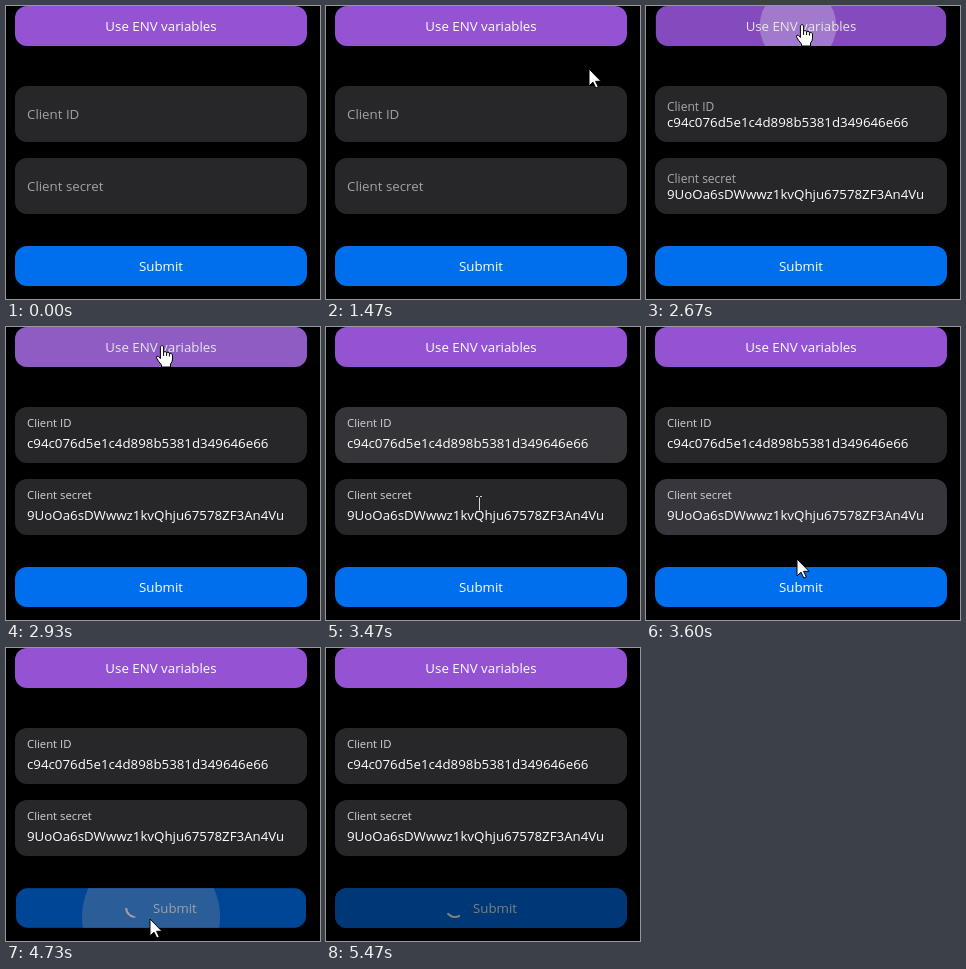
An HTML page with a canvas that plays this animation: 314x293 px, repeating every 5.54 s.

```html
<!DOCTYPE html>
<html lang="en">
<head>
<meta charset="utf-8">
<title>Credentials form</title>
<style>
  html, body { margin: 0; width: 100%; height: 100%; overflow: hidden; background: #000; }
  canvas { display: block; }
</style>
</head>
<body>
<canvas id="stage" width="314" height="293"></canvas>
<script>
const ctx = document.getElementById('stage').getContext('2d');
const LOOP = 5540, STEP = 200 / 3;
const LEFT = 9, WIDTH = 292, CENTER = LEFT + WIDTH / 2;
const FONT = '"Open Sans", "Noto Sans", sans-serif';
const TEXT_SIZE = 13.3, LABEL_SIZE = 11.3;
const FILLED = 2575, SENDING = 4634;

const clamp = v => Math.min(1, Math.max(0, v));
const lerp = (a, b, p) => a + (b - a) * p;
const mix = (a, b, p) => `rgb(${a.map((v, i) => Math.round(lerp(v, b[i], p)))})`;

function bezier(x1, y1, x2, y2) {
  const axis = (a, b, s) => 3 * a * s * (1 - s) ** 2 + 3 * b * s * s * (1 - s) + s ** 3;
  return x => {
    x = clamp(x);
    if (x === 0 || x === 1) return x;
    let lo = 0, hi = 1;
    for (let i = 0; i < 24; i++) {
      const mid = (lo + hi) / 2;
      if (axis(x1, x2, mid) < x) lo = mid; else hi = mid;
    }
    return axis(y1, y2, lo);
  };
}
const ease = bezier(.25, .1, .25, 1);
const easeOut = bezier(0, 0, .58, 1);
const easeInOut = bezier(.42, 0, .58, 1);

// A CSS-like transition that goes on at `on` and reverses from wherever it is at `off`.
function toggle(t, on, off, duration) {
  if (t < off) return ease((t - on) / duration);
  const peak = ease((off - on) / duration);
  return peak * (1 - ease((t - off) / (duration * peak)));
}

function text(str, x, y, color, size = TEXT_SIZE, align = 'left') {
  ctx.font = `${size}px ${FONT}`;
  ctx.textAlign = align;
  ctx.fillStyle = color;
  ctx.fillText(str, x, y);
}

function roundRect(y, height) {
  ctx.beginPath();
  ctx.roundRect(LEFT, y, WIDTH, height, 12);
}

function ripple(t, { start, x, y }) {
  const p = easeInOut((t - start) / 750);
  if (p <= 0 || p >= 1) return;
  ctx.fillStyle = `rgba(255,255,255,${.35 * (1 - p)})`;
  ctx.beginPath();
  ctx.arc(x, y, WIDTH * p, 0, 7);
  ctx.fill();
}

function button(t, { y, color, opacity, press, wave, content }) {
  const scale = 1 - .03 * press;
  ctx.save();
  ctx.translate(CENTER, y + 20);
  ctx.scale(scale, scale);
  ctx.translate(-CENTER, -y - 20);
  roundRect(y, 40);
  ctx.fillStyle = color;
  ctx.fill();
  ctx.save();
  ctx.clip();
  content();
  ripple(t, wave);
  ctx.restore();
  // The page is black, so dimming the whole button is a black veil.
  if (opacity < 1) {
    roundRect(y, 40);
    ctx.fillStyle = `rgba(0,0,0,${1 - opacity})`;
    ctx.fill();
  }
  ctx.restore();
}

function field(t, y, label, value, hover) {
  roundRect(y, 56);
  ctx.fillStyle = mix([39, 39, 42], [63, 63, 70], hover);
  ctx.fill();
  const p = easeOut((t - FILLED) / 200);
  const tone = mix([161, 161, 170], [212, 212, 216], ease((t - 2640) / 200));
  text(label, 21, y + lerp(33, 20, p), tone, lerp(TEXT_SIZE, LABEL_SIZE, p));
  if (t >= FILLED) text(value, 21, y + 41, '#fff');
}

function spinner(x, y, age) {
  const turn = (age % 800) / 800;
  const arc = (p, from, to) => {
    ctx.beginPath();
    ctx.arc(x, y, 9, p * 2 * Math.PI + from * Math.PI, p * 2 * Math.PI + to * Math.PI);
    ctx.stroke();
  };
  ctx.save();
  ctx.strokeStyle = '#fff';
  ctx.lineWidth = 2;
  arc(ease(turn), .27, .73);
  ctx.globalAlpha = .75;
  ctx.lineCap = 'round';
  ctx.setLineDash([0, 4]);
  arc(turn, .27, .73);
  ctx.restore();
}

const arrow = new Path2D('M0 0V17L4 13.2L6.8 19L9.3 18L6.6 12.3H12Z');
const hand = new Path2D('M-1.6 1.5Q0 -.6 1.6 1.5V7Q3.2 5.8 4.6 7.5Q6.2 6.5 7.4 8.3Q9.6 7.7 10.5 10V14Q10.5 17 8.5 19V22H-.5V20Q-4 16 -5.6 12.8Q-5.4 10 -3.5 11.5L-1.6 13.5Z');
const knuckles = new Path2D('M1.6 7V11M4.6 7.5V11M7.4 8.3V11.5');
const beam = new Path2D('M-3 -7.5H-1M1 -7.5H3M.5 -6.5V6.5M-3 7.5H-1M1 7.5H3');

// time, x, y of the pointer's hot spot
const route = [
  [1460, 264, 63], [1730, 205, 48], [2000, 101, 16], [2070, 124, 33], [2270, 154, 20],
  [2470, 154, 20], [2600, 156, 18], [3060, 156, 18], [3200, 157, 52], [3330, 155, 108],
  [3467, 153, 177], [3600, 151, 232], [3670, 151, 252], [3800, 152, 269], [4000, 153, 264],
  [4470, 153, 264], [4533, 146, 270], [4733, 144, 271], [4950, 138, 300]
];

function pointerShape(t) {
  if ((t > 2030 && t < 3150) || (t > 3640 && t < SENDING)) return 'hand';
  if ((t > 3270 && t < 3390) || (t > 3420 && t < 3550)) return 'beam';
  return 'arrow';
}

function pointer(t) {
  const i = route.findIndex(point => point[0] > t);
  if (i < 1) return;
  const [t0, x0, y0] = route[i - 1], [t1, x1, y1] = route[i];
  const p = (t - t0) / (t1 - t0);
  ctx.save();
  ctx.translate(Math.round(lerp(x0, x1, p)), Math.round(lerp(y0, y1, p)));
  ctx.lineWidth = 1;
  ctx.lineJoin = 'round';
  const shape = pointerShape(t);
  if (shape === 'beam') {
    ctx.strokeStyle = '#d8d8d8';
    ctx.stroke(beam);
  } else {
    const outline = shape === 'hand' ? hand : arrow;
    ctx.fillStyle = '#fff';
    ctx.strokeStyle = '#000';
    ctx.fill(outline);
    ctx.stroke(outline);
    if (shape === 'hand') ctx.stroke(knuckles);
  }
  ctx.restore();
}

function draw(t) {
  ctx.fillStyle = '#000';
  ctx.fillRect(0, 0, 314, 293);

  button(t, {
    y: 0, color: '#9353d3',
    opacity: 1 - .1 * toggle(t, 2030, 3140, 250),
    press: toggle(t, 2450, FILLED, 250),
    wave: { start: 2477, x: 152, y: 20 },
    content: () => text('Use ENV variables', CENTER, 25, '#fff', TEXT_SIZE, 'center')
  });

  field(t, 80, 'Client ID', 'c94c076d5e1c4d898b5381d349646e66', toggle(t, 3270, 3425, 150));
  field(t, 152, 'Client secret', '9UoOa6sDWwwz1kvQhju67578ZF3An4Vu', toggle(t, 3465, 3570, 150));

  const sending = t >= SENDING;
  button(t, {
    y: 240, color: '#006fee',
    opacity: 1 - .1 * ease((t - 3680) / 250) - .4 * ease((t - SENDING) / 250),
    press: toggle(t, 4480, SENDING, 250),
    wave: { start: 4480, x: 145, y: 269 },
    content: () => {
      if (sending) spinner(129, 260, t - SENDING);
      text('Submit', CENTER + (sending ? 14 : 0), 265, '#fff', TEXT_SIZE, 'center');
    }
  });

  pointer(t);
}

// Motion advances at 15 pictures a second.
function tick() {
  const t = performance.now() % LOOP;
  draw(Math.floor((t + 4) / STEP) * STEP);
  requestAnimationFrame(tick);
}
tick();
</script>
</body>
</html>
```
